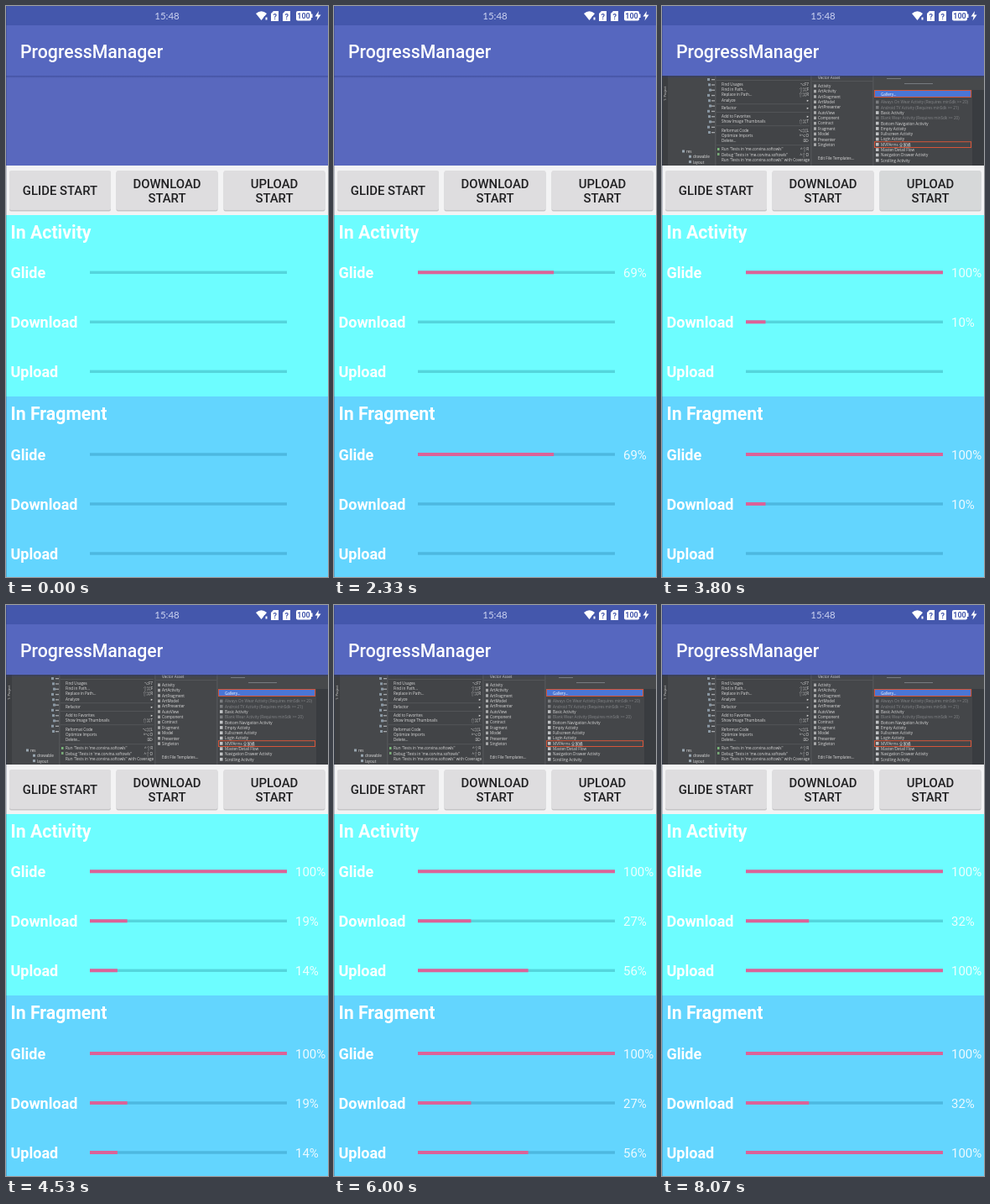
These frames come from a looping animation (384x680 px, 8140 ms). An HTML page:

```html
<!DOCTYPE html>
<html lang="en">
<head>
<meta charset="utf-8">
<title>ProgressManager</title>
<style>
html, body { margin: 0; width: 100%; height: 100%; overflow: hidden; }
svg { display: block; width: 100vw; height: 100vh; font-family: Roboto, sans-serif; }
.menu { font: 4.6px "Open Sans", "Noto Sans CJK SC", sans-serif; fill: #dadada; }
.head { font-size: 21.3px; font-weight: 700; fill: #fff; }
.label { font-size: 18px; font-weight: 700; fill: #fff; }
.percent { font-size: 15px; fill: #fff; fill-opacity: .88; }
.button { font-size: 14.9px; font-weight: 500; fill: #202022; text-anchor: middle; }
</style>
</head>
<body>
<svg viewBox="0 0 384 680" preserveAspectRatio="none">
  <defs>
    <linearGradient id="shade" x2="0" y2="1">
      <stop stop-color="#26347c" stop-opacity=".45"/>
      <stop offset="1" stop-color="#26347c" stop-opacity="0"/>
    </linearGradient>
    <clipPath id="frame"><path d="M0 83H384V190H0z"/></clipPath>
  </defs>
  <path fill="#f3f3f4" d="M0 0H384V680H0z"/>
  <path id="placeholder" fill="#5968be" d="M0 83H384V190H0z"/>
  <g id="photo" class="menu" clip-path="url(#frame)"></g>
  <path fill="#5667bf" d="M0 23H384V83H0z"/>
  <path fill="#4457ac" d="M0 0H384V23H0z"/>
  <path fill="url(#shade)" d="M0 83H384V86H0z"/>
  <text x="17" y="62" font-size="21.3" font-weight="500" fill="#fff">ProgressManager</text>

  <text x="192" y="16" font-family="Lato, sans-serif" font-size="11.5" fill="#ccd3f1" text-anchor="middle">15:48</text>
  <g fill="#fff">
    <path d="M298 9Q304.500 3.500 311 9L304.500 17z"/>
    <path d="M308 12H313V18H306z" fill="#4457ac"/>
    <path d="M309.500 13.500h2v3h-2z"/>
    <path d="M319 6H325V18H316V9zM333 6H339V18H330V9z"/>
    <rect x="346" y="6" width="18" height="11.500" rx="2"/>
    <path d="M364 9.500h1.500v4.500h-1.500zM373 6L368.500 12.500H371.500L370.500 17.500L375.500 10.500H372.300z"/>
  </g>
  <g fill="#4457ac" font-weight="700" text-anchor="middle">
    <text x="320.700" y="15.500" font-size="9">?</text>
    <text x="334.700" y="15.500" font-size="9">?</text>
    <text x="355" y="15" font-size="9">100</text>
  </g>

  <path fill="#6dfdff" d="M0 249H384V465H0z"/>
  <path fill="#63d5fe" d="M0 465H384V680H0z"/>
  <g id="ui"></g>
  <path fill="#1c2850" fill-opacity=".25" d="M0 0H1V680H0z"/>
</svg>
<script>
const LOOP = 8140;
const $ = id => document.getElementById(id);

function add(parent, tag, attrs, text = '') {
  const el = document.createElementNS('http://www.w3.org/2000/svg', tag);
  for (const key in attrs) el.setAttribute(key, attrs[key]);
  el.textContent = text;
  parent.append(el);
  return el;
}
const rect = (parent, x, y, width, height, fill, more) =>
  add(parent, 'rect', { x, y, width, height, fill, ...more });
const write = (parent, x, y, text, more) => add(parent, 'text', { x, y, ...more }, text);

// Loaded picture: an editor window with nested context menus
const photo = $('photo');
rect(photo, 0, 83, 384, 107, '#46484b');
rect(photo, 0, 83, 7, 107, '#3c3e41');
rect(photo, 64, 83, 114, 107, '#424447');
rect(photo, 178, 83, 74, 107, '#45474a');
rect(photo, 252, 83, 132, 17, '#47494b');
rect(photo, 252, 100, 118, 90, '#444649');
rect(photo, 370, 100, 14, 90, '#393c40');
for (const x of [63.5, 177.5, 251.5]) rect(photo, x, 83, .8, 107, '#5f6164');
write(photo, 0, 0, '1: Project', { transform: 'translate(5 113) rotate(-90)', 'font-size': 4 });

for (let i = 0; i < 11; i++) {
  const y = 86 + i * 6.3;
  rect(photo, 54 + i % 3, y, 3, 3, '#8b99a5');
  rect(photo, 59, y + 1, 4, 1.3, '#a5a7aa');
}
[[24, 'res'], [32, 'drawable'], [32, 'layout']].forEach(([x, name], i) => {
  const y = 175 + i * 6.3;
  rect(photo, x, y - 3.5, 3, 3, '#98a5af');
  write(photo, x + 5, y, name);
});
rect(photo, 268, 86, 17, 1, '#777b80');
rect(photo, 289, 92, 34, 1, '#777b80');

const task = "Tests in 'me.corvina.softowls'";
[
  [95, 'Find Usages', '⌥F7'], [101, 'Find in Path...', '⇧⌘F'],
  [107, 'Replace in Path...', '⇧⌘R'], [113.5, 'Analyze', '▸'],
  [123, 'Refactor', '▸'], [133, 'Add to Favorites', '▸'],
  [139, 'Show Image Thumbnails', '⇧⌘T'], [149.5, 'Reformat Code', '⌥⌘L'],
  [156, 'Optimize Imports', '^⌥O'], [162, 'Delete...', '⌦'],
  [172, `Run '${task}'`, '^⇧R'], [178.5, `Debug '${task}'`, '^⇧D'],
  [185, `Run '${task}' with Coverage`, '']
].forEach(([y, name, key]) => {
  write(photo, 71, y, name);
  write(photo, 175, y, key, { 'text-anchor': 'end' });
});
for (const y of [88, 116.5, 126, 142.5, 165.5]) rect(photo, 65, y, 111, .6, '#5f6164');
rect(photo, 66, 169, 2.5, 3, '#79b779');
rect(photo, 66, 175, 2.5, 3, '#78aa78');

write(photo, 186, 87, 'Vector Asset');
rect(photo, 179, 89, 72, .6, '#5f6164');
['Activity', 'ArtActivity', 'ArtFragment', 'ArtModel', 'ArtPresenter', 'AutoView',
  'Component', 'Contract', 'Fragment', 'Model', 'Presenter', 'Singleton'].forEach((name, i) => {
  const y = 97 + i * 6.35;
  rect(photo, 181, y - 3.5, 3, 3.5, '#a9aaab');
  write(photo, 186, y, name);
});
write(photo, 186, 182.5, 'Edit File Templates...');

const outlined = { stroke: '#d5553a', 'stroke-width': 1 };
rect(photo, 253.5, 100.5, 115, 8, '#4a76d6', outlined);
write(photo, 261, 106.5, 'Gallery...', { fill: '#fff' });
['Always On Wear Activity (Requires minSdk >= 20)', 'Android TV Activity (Requires minSdk >= 21)',
  'Basic Activity', 'Blank Wear Activity (Requires minSdk >= 20)', 'Bottom Navigation Activity',
  'Empty Activity', 'Fullscreen Activity', 'Login Activity', 'MVPArms 全家桶',
  'Master/Detail Flow', 'Navigation Drawer Activity', 'Scrolling Activity'].forEach((name, i) => {
  const y = 116.3 + i * 6.3;
  const dim = name.includes('Requires');
  rect(photo, 255, y - 3.7, 3.5, 3.7, dim ? '#7b7d80' : '#c0c2c4');
  write(photo, 261, y, name, dim ? { style: 'fill: #85878a' } : {});
});
rect(photo, 253.5, 161.7, 115, 6.8, 'none', outlined);

// Buttons and rows
const ui = $('ui');
const presses = [
  [64.5, 1350, ['GLIDE START']],
  [192, 2850, ['DOWNLOAD', 'START']],
  [320, 3600, ['UPLOAD', 'START']]
].map(([x, at, lines]) => {
  rect(ui, x - 60.5, 197, 121, 47.5, '#c6c5c7', { rx: 2 });
  rect(ui, x - 60.5, 196, 121, 47, '#dedddf', { rx: 2 });
  const ripple = rect(ui, x - 60.5, 196, 121, 47, '#b9c4c4', { rx: 2 });
  lines.forEach((line, i) => write(ui, x, (lines.length > 1 ? 216.7 : 224.8) + i * 17, line, { class: 'button' }));
  return { at, ripple };
});

// Each track lists [time, percent] points
const tracks = [
  ['Glide', [[1500, 0], [2700, 100]]],
  ['Download', [[3150, 0], [3800, 10.4], [4400, 19], [5330, 25.4], [6670, 29.4], [8070, 32.4]]],
  ['Upload', [[4025, 0], [5330, 37.4], [6670, 75.4], [7545, 100]]]
];
const rows = [];
[['In Activity', 248, '#54d5dc'], ['In Fragment', 464.7, '#4db8e0']].forEach(([title, top, color]) => {
  write(ui, 5.5, top + 28.5, title, { class: 'head' });
  tracks.forEach(([name, points], i) => {
    const y = top + 69.3 + i * 59;
    write(ui, 5.5, y + 6.8, name, { class: 'label' });
    rect(ui, 100, y - 1.7, 235, 3.4, color);
    rows.push({
      points,
      bar: rect(ui, 100, y - 2, 0, 4, '#dc6298'),
      label: write(ui, 345, y + 6, '', { class: 'percent' })
    });
  });
});

const clamp = v => Math.max(0, Math.min(1, v));

function valueAt(points, t) {
  let value = points[0][1];
  for (let i = 1; i < points.length; i++) {
    const [t0, v0] = points[i - 1], [t1, v1] = points[i];
    if (t >= t0) value = v0 + (v1 - v0) * clamp((t - t0) / (t1 - t0));
  }
  return Math.floor(value);
}

function draw(now) {
  const t = now % LOOP;
  // Both layers fade at once, so the white behind shows through
  const fade = clamp((t - 2890) / 300);
  photo.setAttribute('opacity', fade);
  $('placeholder').setAttribute('opacity', 1 - fade);
  for (const { at, ripple } of presses) {
    const age = t - at;
    ripple.setAttribute('opacity', .25 * clamp(age / 80) * clamp((420 - age) / 250));
  }
  for (const { points, bar, label } of rows) {
    const percent = valueAt(points, t);
    bar.setAttribute('width', 2.35 * percent);
    label.textContent = t >= points[0][0] ? percent + '%' : '';
  }
  requestAnimationFrame(draw);
}
draw(performance.now());
</script>
</body>
</html>
```
